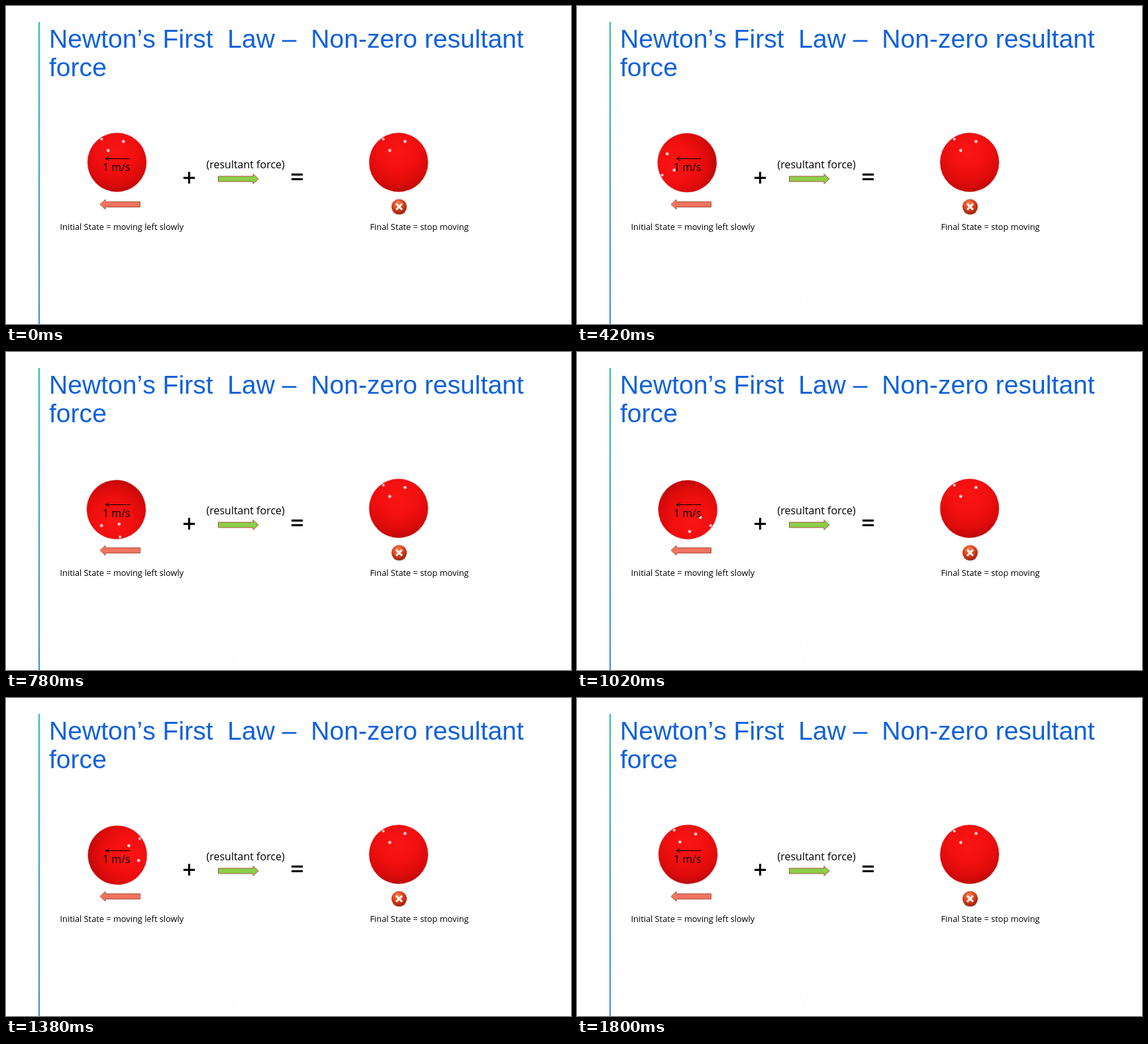
An HTML page that plays this animation: 853 by 480 pixels, repeating every 1860 ms.

```html
<!DOCTYPE html>
<html lang="en">
<head>
<meta charset="utf-8">
<title>Non-zero resultant force</title>
<style>
  html, body { margin: 0; width: 100%; height: 100%; overflow: hidden; background: #fff; }
  svg { display: block; }
  text { font: 500 16px "Open Sans", sans-serif; white-space: pre; }
  .title { font: 39.1px "Liberation Sans", Arial, sans-serif; font-kerning: none; fill: #1061dc; }
  .caption { font-size: 12.8px; }
  .sign { font-size: 36px; font-weight: 600; text-anchor: middle; }
</style>
</head>
<body>
<svg width="853" height="480" viewBox="0 0 853 480">
  <defs>
    <linearGradient id="rule" x2="0" y2="1">
      <stop offset="0" stop-color="#2cbfa8"/>
      <stop offset="1" stop-color="#3f86e4"/>
    </linearGradient>
    <radialGradient id="red" cx=".48" cy=".32" r=".7">
      <stop offset="0" stop-color="#fb1414"/>
      <stop offset=".5" stop-color="#f00f0f"/>
      <stop offset=".8" stop-color="#da0a0a"/>
      <stop offset="1" stop-color="#b80808"/>
    </radialGradient>
    <radialGradient id="glint">
      <stop offset="0" stop-color="#fff"/>
      <stop offset=".4" stop-color="#ffd0d0"/>
      <stop offset="1" stop-color="#ff5050" stop-opacity="0"/>
    </radialGradient>
    <radialGradient id="badge" cx=".42" cy=".3" r=".72">
      <stop offset="0" stop-color="#f58a58"/>
      <stop offset=".5" stop-color="#dc4420"/>
      <stop offset="1" stop-color="#9c1c08"/>
    </radialGradient>
    <g id="ball">
      <circle r="44.5" fill="url(#red)" stroke="#d84848" stroke-opacity=".5"/>
      <g fill="url(#glint)">
        <circle cx="-23" cy="-35" r="3"/>
        <circle cx="9.7" cy="-31.5" r="3.5"/>
        <circle cx="-13.3" cy="-18" r="3.5"/>
      </g>
    </g>
    <path id="arrow" d="M0-4H52.5V-7.5L60.5 0L52.5 7.5V4H0Z" stroke="#a85440"/>
  </defs>

  <path d="M262 80L343 470L380 262M333 72L318 230M757 80L832 235" fill="none" stroke="#fbfbfb"/>
  <rect x="49" y="24" width="2" height="456" fill="url(#rule)"/>
  <text class="title" x="65" y="63">Newton’s First  Law –  Non-zero resultant</text>
  <text class="title" x="65" y="106">force</text>

  <g id="spin"><use href="#ball" x="167.5" y="236"/></g>
  <path d="M187.5 230.5H150M156 227.5L150 230.5L156 233.5" fill="none" stroke="#000"/>
  <text x="146" y="249">1 m/s</text>
  <use href="#arrow" transform="translate(202.5 299.5) scale(-1 1)" fill="#f2745f"/>
  <text class="caption" x="81.5" y="338">Initial State = moving left slowly</text>

  <text class="sign" x="276.5" y="271.5">+</text>
  <text x="302.5" y="245">(resultant force)</text>
  <use href="#arrow" x="320.5" y="261" fill="#8ccf48"/>
  <text class="sign" x="439.5" y="271">=</text>

  <use href="#ball" x="592.7" y="236"/>
  <ellipse cx="594" cy="312" rx="9" ry="3" fill="#ccc"/>
  <circle cx="593.5" cy="303" r="11.5" fill="url(#badge)"/>
  <path d="M589 298.5L598 307.5M598 298.5L589 307.5" stroke="#fff" stroke-width="3"/>
  <text class="caption" x="549.5" y="338">Final State = stop moving</text>
</svg>
<script>
  const LOOP = 1860, STEP = 60, TURN = 11.88; // ms, ms, degrees per step
  const spin = document.getElementById("spin");

  function draw() {
    const step = Math.floor(performance.now() % LOOP / STEP);
    // The pivot sits slightly off the ball's centre, so it wobbles.
    spin.setAttribute("transform", `rotate(${-TURN * step} 167.2 237)`);
    requestAnimationFrame(draw);
  }
  draw();
</script>
</body>
</html>
```
